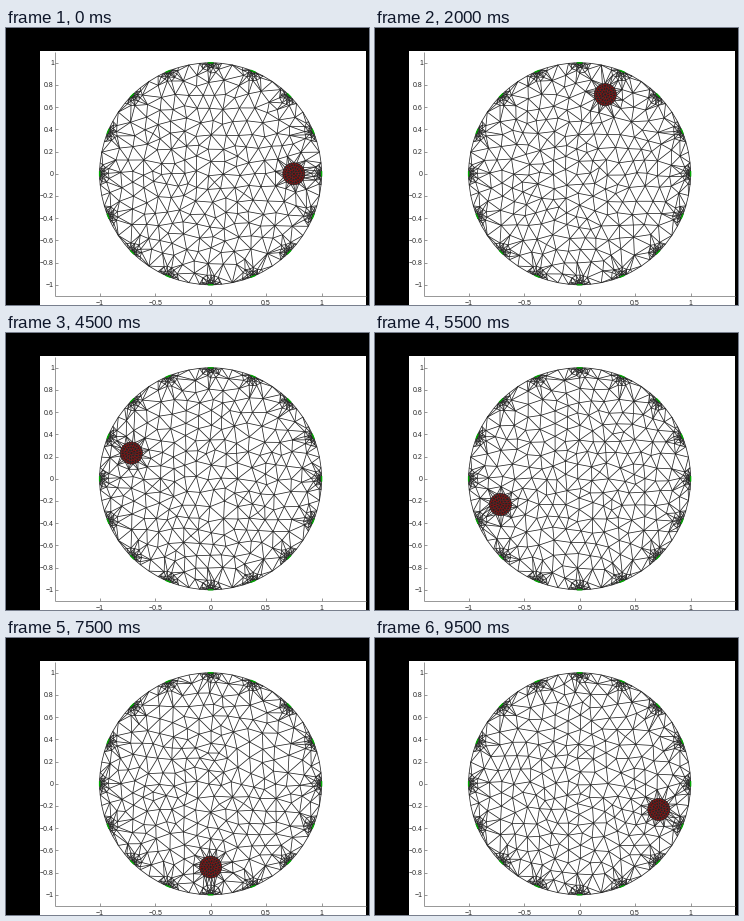
Recreate the animation shown at these times as a matplotlib script. Size 363 by 277 pixels, loop 10 s.

```python
import numpy as np
import matplotlib.pyplot as plt
from matplotlib.animation import FuncAnimation
from matplotlib.collections import LineCollection, PolyCollection
from matplotlib.patches import Rectangle
from matplotlib.tri import Triangulation

W, H, DPI = 363, 277, 64
PX = 72 / DPI                      # points per pixel
CX, CY, UNIT = 204.6, 145.8, 111.0
FRAMES, INTERVAL = 20, 500
ORBIT, BLOB = 0.75, 0.1
GRID, CELL = 0.117, 0.084          # lattice pitch and smallest free spacing
ELECTRODES = np.arange(16) * np.pi / 8


def polar(radius, angle):
    return np.column_stack([radius * np.cos(angle), radius * np.sin(angle)])


def to_px(p):
    return np.asarray(p) * [UNIT, -UNIT] + [CX, CY]


def ring(radius, count, phase=0.0):
    return polar(radius, phase + np.arange(count) * 2 * np.pi / count)


def electrode_nodes(angle, rng):
    """Boundary nodes and half rings that grade the mesh towards an electrode."""
    half = np.array([0.008, 0.016, 0.025, 0.045, 0.1])
    steps = np.concatenate([-half[::-1], [0], half, [np.pi / 16]])
    parts = [polar(1.0, angle + steps)]
    hub = polar(1.0, np.array([angle]))
    for radius, count in ((0.022, 6), (0.046, 8), (0.085, 7)):
        fan = angle + np.pi + np.linspace(-1.3, 1.3, count)
        fan = fan + rng.uniform(-0.1, 0.1, count)
        parts.append(hub + polar(radius * rng.uniform(0.85, 1.15, count), fan))
    return np.vstack(parts)


def candidates(frame):
    """A jittered lattice that hardly changes, then random points to fill gaps."""
    rng = np.random.default_rng(5)
    axis = np.arange(-8, 9) * GRID
    lattice = np.stack(np.meshgrid(axis, axis), axis=-1).reshape(-1, 2)
    lattice += rng.uniform(-0.03, 0.03, lattice.shape)
    fill = polar(0.96 * np.sqrt(rng.random(3000)), rng.random(3000) * 2 * np.pi)
    wobble = np.random.default_rng(100 + frame)
    lattice += wobble.uniform(-0.014, 0.014, lattice.shape)
    points = np.vstack([lattice, fill])
    return points[np.hypot(*points.T) < 0.96]


def build_mesh(frame):
    turn = 2 * np.pi * frame / FRAMES
    center = polar(ORBIT, np.array([turn]))
    blob = np.vstack([center] + [center + ring(r, n, turn + r) for r, n in
                                 ((BLOB, 26), (0.078, 22), (0.052, 15), (0.026, 8))])
    rng = np.random.default_rng(7)
    fixed = np.vstack([blob] + [electrode_nodes(a, rng) for a in ELECTRODES])
    hubs = polar(1.0, ELECTRODES)

    # Accept free nodes with a spacing that shrinks near refined parts.
    tries = candidates(frame)
    to_hub = np.linalg.norm(tries[:, None] - hubs, axis=2).min(axis=1)
    to_blob = np.linalg.norm(tries - center, axis=1) - BLOB
    gap = np.minimum(CELL, 0.03 + 0.5 * np.minimum(to_hub, to_blob))
    nodes = np.empty((len(fixed) + len(tries), 2))
    nodes[:len(fixed)] = fixed
    count = len(fixed)
    for p, g, d in zip(tries, gap, to_blob):
        if d > 0.05 and ((nodes[:count] - p) ** 2).sum(axis=1).min() > g * g:
            nodes[count] = p
            count += 1
    nodes = nodes[:count]

    # Relax the free nodes towards the mean of their neighbours.
    free = slice(len(fixed), count)
    for _ in range(2):
        a, b = Triangulation(*nodes.T).edges.T
        total, degree = np.zeros_like(nodes), np.zeros(count)
        for i, j in ((a, b), (b, a)):
            np.add.at(total, i, nodes[j])
            np.add.at(degree, i, 1)
        mean = total[free] / degree[free, None]
        nodes[free] += 0.3 * (mean - nodes[free])

    mesh = Triangulation(*nodes.T)
    faces = nodes[mesh.triangles]
    inside = np.linalg.norm(faces.mean(axis=1) - center, axis=1) < BLOB
    return to_px(nodes[mesh.edges]), to_px(faces[inside])


meshes = [build_mesh(k) for k in range(FRAMES)]

fig = plt.figure(figsize=(W / DPI, H / DPI), dpi=DPI, facecolor="black")
ax = fig.add_axes([0, 0, 1, 1])
ax.set(xlim=(0, W), ylim=(H, 0))
ax.axis("off")
ax.add_patch(Rectangle((34, 23), 326, 254, fc="white", ec="none", zorder=0))


def rule(xs, ys):
    ax.plot(xs, ys, color="0.5", lw=0.8 * PX, zorder=1, solid_capstyle="butt")


def label(x, y, value, align):
    text = f"{value:g}".replace("-", "\u2212")
    ax.text(x, y, text, ha=align, va="baseline", color="0.15",
            family="Liberation Sans", size=7 * PX)


rule([49, 49], [24, 268])
rule([49, 360], [268, 268])
for i in range(-5, 6):
    y = CY - UNIT * i / 5
    rule([49, 52], [y, y])
    label(48, y + 2.4, i / 5, "right")
for i in range(-2, 3):
    x = CX + UNIT * i / 2
    rule([x, x], [265, 268])
    label(x, 276.6, i / 2, "center")

blob_faces = PolyCollection([], facecolors="#c80000", edgecolors="none", zorder=2)
edges = LineCollection([], colors="#202020", linewidths=0.75 * PX, zorder=3)
pads = LineCollection([to_px(polar(1.0, a + np.linspace(-0.025, 0.025, 5)))
                       for a in ELECTRODES],
                      colors="#00a800", linewidths=1.4 * PX, zorder=4)
for artist in (blob_faces, edges, pads):
    ax.add_collection(artist, autolim=False)


def update(frame):
    lines, faces = meshes[frame % FRAMES]
    edges.set_segments(lines)
    blob_faces.set_verts(faces)
    return blob_faces, edges


anim = FuncAnimation(fig, update, frames=FRAMES, interval=INTERVAL,
                     repeat=True, repeat_delay=0)
plt.show()
```
